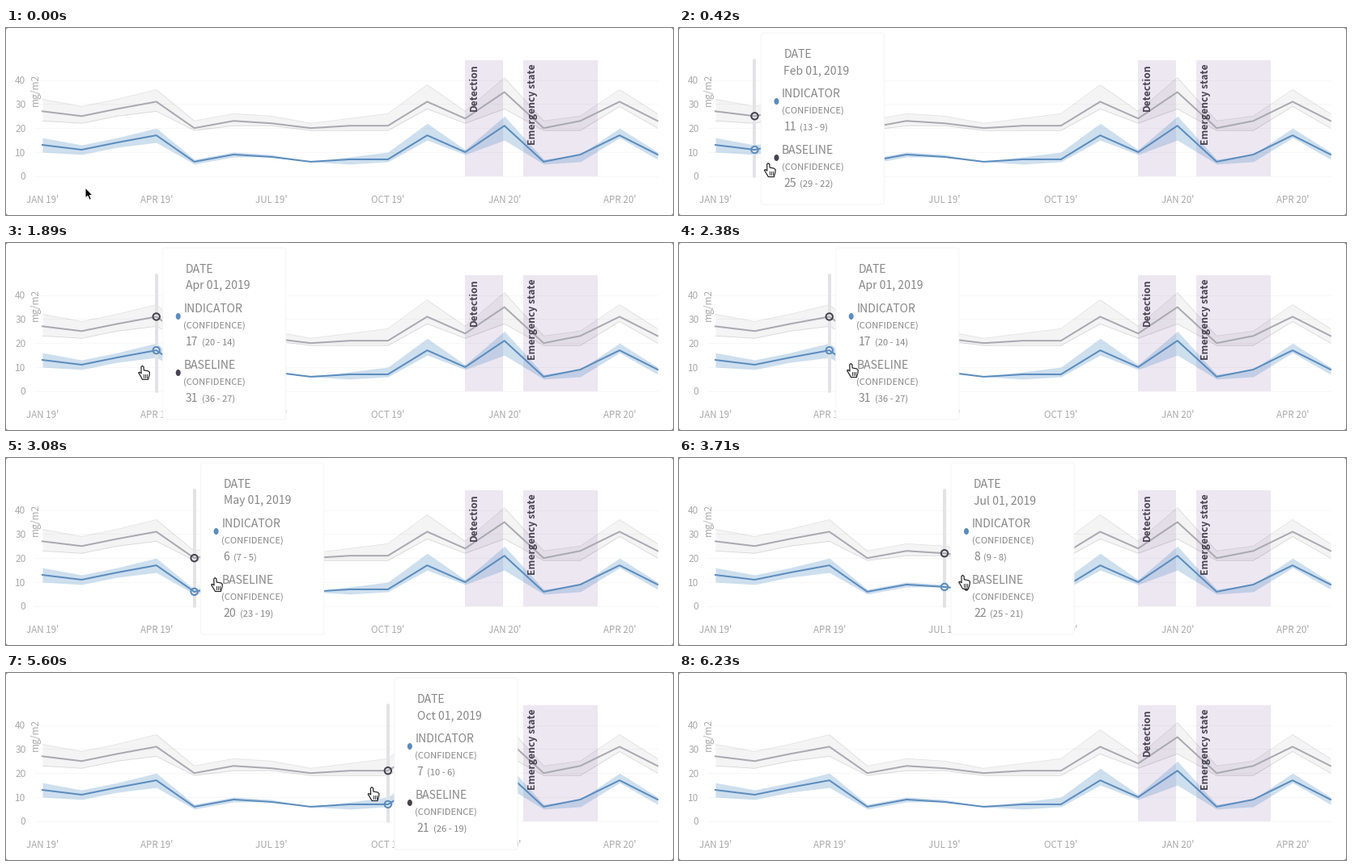
These frames come from a looping animation (824x232 px, 6.44 s). A matplotlib script:

```python
import numpy as np
import matplotlib.pyplot as plt
from matplotlib.animation import FuncAnimation
from matplotlib.patches import Ellipse, FancyBboxPatch, Polygon, Rectangle

W, H, DPI = 824, 232, 80
STEP, FRAMES = 70, 92
PX = 72 / DPI
TOP, FLOOR = 40, 183.8

plt.rcParams["font.family"] = ["Noto Sans CJK JP", "DejaVu Sans"]

BLUE, GREY, DARK = "#5b8cbe", "#a9a9b2", "#47434f"
LABEL, TEXT = "#aaaaaa", "#878787"

DATES = np.arange("2019-01", "2020-06", dtype="datetime64[M]")
DAYS = DATES.astype("datetime64[D]").astype(int)
XS = 45 + 1.5636 * (DAYS - DAYS[0])

# monthly readings with the margins above and below them
mean = np.array([13, 11, 14, 17, 6, 9, 8, 6, 7, 7, 17, 10, 21, 6, 9, 17, 9])
above = np.array([3, 2, 2, 3, 1, 1, 1, 0, 1, 3, 5, 1, 4, 1, 0, 3, 1])
below = np.array([3, 2, 2, 3, 1, 1, 0, 0, 2, 1, 2, 1, 6, 1, 3, 1, 2])
INDICATOR = np.array([mean, mean + above, mean - below])

# the baseline runs parallel, with a wider band that never drops below 19
BASELINE = np.array([mean + 14, mean + above + 16,
                     np.maximum(mean - below + 13, 19)])


def to_y(value):
    return FLOOR - 2.98 * value


def date_text(i, fmt):
    return DATES[i].astype(object).strftime(fmt)


fig = plt.figure(figsize=(W / DPI, H / DPI), dpi=DPI, facecolor="#8c8c8c")
ax = fig.add_axes([0, 0, 1, 1])
ax.set_xlim(0, W)
ax.set_ylim(H, 0)
ax.axis("off")


def label(x, y, text="", size=12, color=LABEL, z=5, **kw):
    return ax.text(x, y, text, fontsize=size * PX, color=color, zorder=z, **kw)


def upright(x, y, text, **kw):
    label(x, y, text, rotation=90, rotation_mode="anchor",
          ha="right", va="baseline", **kw)


def rounded(x, y, w, h, **kw):
    return ax.add_patch(FancyBboxPatch(
        (x, y), w, h, boxstyle="round,pad=0,rounding_size=3", **kw))


def draw_zone(left, right, name, baseline):
    ax.add_patch(Rectangle((left, TOP), right - left, FLOOR - TOP,
                           fc="#ede7f2", ec="none", zorder=1))
    upright(baseline, 44.5, name, size=12.2, color=DARK, weight="bold")


def draw_series(series, color, fill, alpha, edge):
    line, high, low = to_y(series)
    ax.fill_between(XS, low, high, color=fill, alpha=alpha, lw=0, zorder=2)
    for y in (high, low):
        ax.plot(XS, y, color=fill, alpha=edge, lw=0.8 * PX, zorder=2)
    ax.plot(XS, line, color=color, lw=2 * PX, zorder=3)


def draw_chart():
    rounded(0, 0, W, H, fc="white", ec="none", zorder=0)
    draw_zone(567.5, 614, "Detection", 581.5)
    draw_zone(639, 731.5, "Emergency state", 654)
    for v in range(0, 50, 10):
        y = to_y(v)
        ax.plot([35, 805], [y, y], color="black", alpha=0.03, lw=PX, zorder=1.5)
        label(24.5, y + 4.7, str(v), ha="right")
    for i in range(0, len(XS), 3):
        label(XS[i], 217, date_text(i, "%b %y'").upper(), 11.6, ha="center")
    upright(39.5, 56.5, "mg/m2")
    draw_series(BASELINE, GREY, "black", 0.045, 0.12)
    draw_series(INDICATOR, BLUE, "#5f97c9", 0.3, 0)


class Tooltip:
    """Vertical pointer, two markers and the floating card."""

    def __init__(self):
        self.rule, = ax.plot([], [], color="#e3e3e5", lw=4 * PX, zorder=2.5,
                             solid_capstyle="round")
        self.card = rounded(0, 6, 152, 213, fc="white", ec="#f5f5f5",
                            lw=PX, zorder=7)
        self.fixed = []
        self.text(28, 37, "DATE")
        self.date = self.text(28, 57)
        self.blocks = [self.block(86, "INDICATOR", INDICATOR, BLUE, BLUE),
                       self.block(156, "BASELINE", BASELINE, DARK, DARK)]
        self.parts = [self.rule, self.card, *(item for item, _ in self.fixed)]
        for _, *artists in self.blocks:
            self.parts += artists

    def text(self, dx, y, text="", size=14):
        item = label(0, y, text, size, TEXT, 8)
        self.fixed.append((item, dx))
        return item

    def block(self, y, title, series, color, ring_color):
        self.text(25.5, y, title)
        self.text(25.5, y + 20, "(CONFIDENCE)", 11.2)
        value = self.text(28, y + 41)
        span = label(0, y + 41, "", 11.2, TEXT, 8)
        dot = ax.add_patch(Ellipse((0, y + 5), 6, 8, fc=color, ec="none",
                                   zorder=8))
        ring = ax.add_patch(Ellipse((0, 0), 8.4, 8.4, fc="none", ec=ring_color,
                                    lw=2 * PX, zorder=6))
        return series, value, span, dot, ring

    def show(self, i):
        for part in self.parts:
            part.set_visible(i is not None)
        if i is None:
            return
        x, left = XS[i], XS[i] + 8
        self.rule.set_data([x, x], [TOP, FLOOR])
        self.card.set_x(left)
        for item, dx in self.fixed:
            item.set_x(left + dx)
        self.date.set_text(date_text(i, "%b %d, %Y"))
        for series, value, span, dot, ring in self.blocks:
            mid, high, low = series[:, i]
            value.set_text(str(mid))
            span.set_text(f"({high} - {low})")
            span.set_x(left + 32 + 8 * len(str(mid)))
            dot.set_center((left + 19, dot.get_center()[1]))
            ring.set_center((x, to_y(mid)))


ARROW = np.array([(0, 0), (0, 13), (3, 10.3), (5.2, 15.3), (7.4, 14.3),
                  (5.3, 9.5), (9, 9.5)])
HAND = np.array([(3.8, 2), (5.3, 0.6), (6.9, 1.8), (7.2, 6), (12.5, 7),
                 (14.3, 8.6), (14, 12), (12.4, 17.5), (5.5, 17.5),
                 (0.6, 9.2), (1.8, 8.4), (4, 10)])


class Cursor:
    def __init__(self):
        self.arrow = ax.add_patch(Polygon(ARROW, fc="black", ec="white",
                                          lw=PX, zorder=10))
        self.hand = ax.add_patch(Polygon(HAND, fc="white", ec="#222222",
                                         lw=1.2 * PX, zorder=10,
                                         joinstyle="round"))
        self.knuckles = [ax.plot([], [], color="#222222", lw=0.9 * PX,
                                 zorder=11)[0] for _ in range(3)]

    def move(self, x, y, pointing):
        self.arrow.set_xy(ARROW + (x, y))
        self.hand.set_xy(HAND + (x, y))
        self.arrow.set_visible(not pointing)
        self.hand.set_visible(pointing)
        for k, line in enumerate(self.knuckles):
            kx = x + 7.3 + 2 * k
            line.set_data([kx, kx], [y + 11, y + 15])
            line.set_visible(pointing)


# cursor path: time, x, y
PATH = np.array([
    (0, 98, 198), (490, 106, 162), (910, 106, 162), (1330, 113, 155),
    (2380, 207, 149), (3080, 253, 148), (4270, 427, 142), (4410, 427, 142),
    (4690, 446.6, 141), (5600, 446.6, 141), (6230, 428, 236)])


def hovered(x, y):
    """Month nearest to the cursor while it is above the time axis."""
    return np.abs(XS - x - 2).argmin() if y < FLOOR else None


draw_chart()
tooltip = Tooltip()
cursor = Cursor()


def update(n):
    x, y = (np.interp(n * STEP, PATH[:, 0], PATH[:, k]) for k in (1, 2))
    month = hovered(x, y)
    tooltip.show(month)
    cursor.move(x, y, month is not None)
    return []


anim = FuncAnimation(fig, update, frames=FRAMES, interval=STEP,
                     init_func=lambda: update(0), repeat=True, repeat_delay=0)
plt.show()
```
